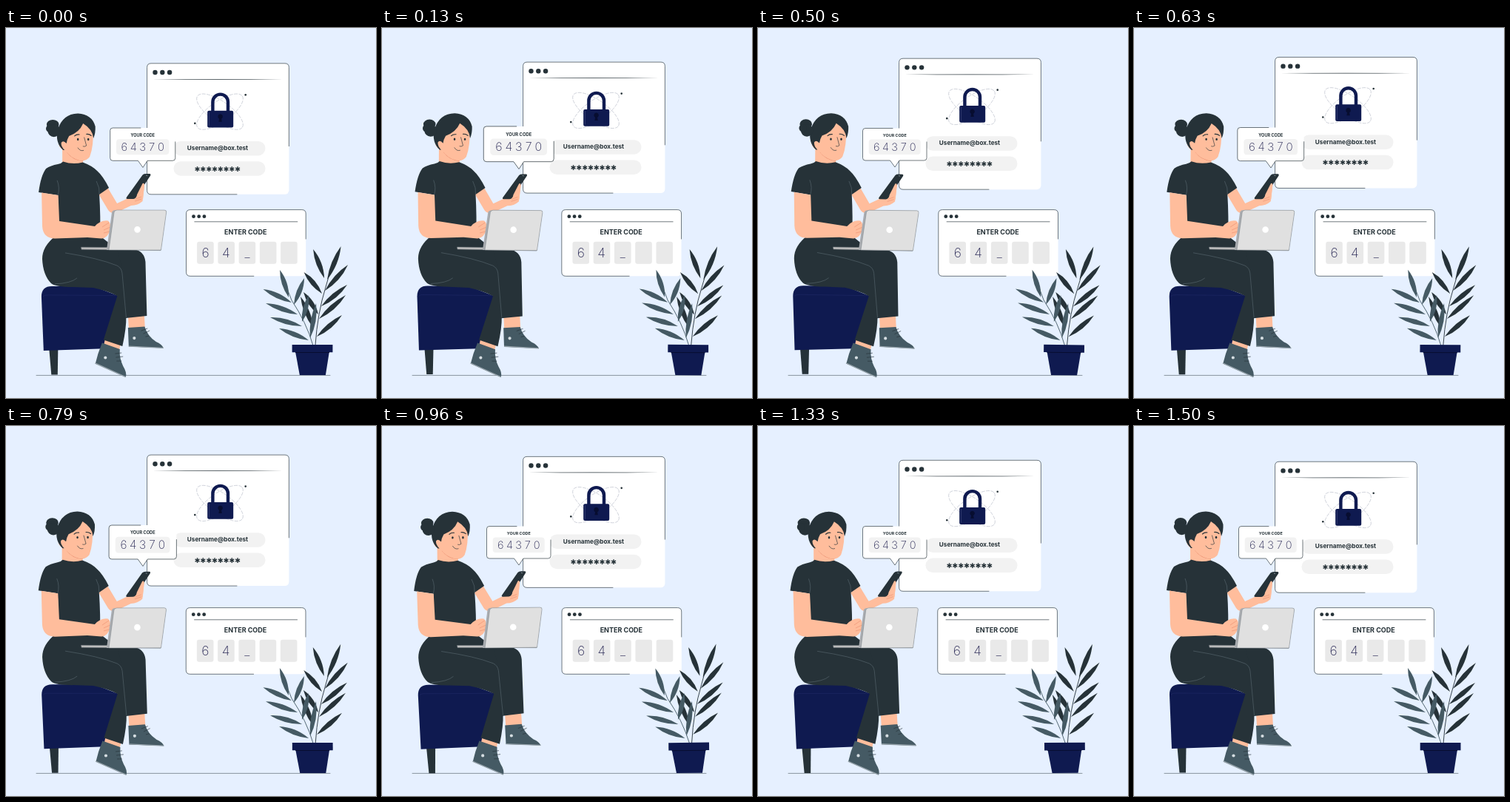
An HTML page that plays this animation: 500x500 px, repeating every 1.54 s.

```html
<!DOCTYPE html>
<html lang="en">
<head>
<meta charset="utf-8">
<title>Enter code</title>
<style>
html, body { margin: 0; width: 100%; height: 100%; overflow: hidden; background: #e6f0ff; }
svg { display: block; width: 100vw; height: 100vh; }
text { font-family: Inter, "Open Sans", sans-serif; text-anchor: middle; fill: #263238; }
.dark { fill: #263238; }
.slate { fill: #455a64; }
.navy { fill: #0f1a50; }
.skin { fill: #ffbd9c; }
.panel { fill: #fff; }
.field { fill: #f2f2f2; }
.cell { fill: #e9e9e9; }
.line { fill: none; stroke: #263238; stroke-width: .65; stroke-linecap: round; }
.seam { fill: none; stroke: #64757d; stroke-width: .5; }
.fold { fill: none; stroke: #e98e70; stroke-width: .6; }
.digit { fill: #2c2b58; font-weight: 200; }
.bold { font-weight: 700; }
</style>
</head>
<body>
<svg viewBox="0 0 500 500" xmlns="http://www.w3.org/2000/svg">
  <rect width="500" height="500" fill="#e6f0ff"/>
  <path class="line" d="M41 469.4H438" opacity=".75"/>

  <g id="login">
    <rect class="panel" x="190.6" y="48.2" width="191.8" height="177" rx="5.5"/>
    <path class="line" d="M312 225.2H196Q190.6 225.2 190.6 219.7V53.7Q190.6 48.2 196 48.2H377Q382.4 48.2 382.4 53.7V160"/>
    <g class="dark"><circle cx="201.5" cy="60.4" r="3.2"/><circle cx="211.3" cy="60.4" r="3.2"/><circle cx="221.1" cy="60.4" r="3.2"/></g>
    <path class="dark" d="M198 69.7Q286 69.2 374 69.7Q286 70.7 198 69.7Z"/>
    <g fill="none" stroke="#aab0bd" stroke-width=".5" stroke-dasharray="5 1.5">
      <ellipse cx="289" cy="113.5" rx="37" ry="14" transform="rotate(35 289 113.5)"/>
      <ellipse cx="289" cy="113.5" rx="37" ry="14" transform="rotate(-35 289 113.5)"/>
    </g>
    <circle class="dark" cx="323.7" cy="90.7" r="1.3"/>
    <circle class="dark" cx="255.3" cy="129.2" r="1.3"/>
    <path d="M279.4 114V100.3a10.3 10.3 0 0 1 20.6 0V114" fill="none" stroke="#0f1a50" stroke-width="4.4"/>
    <rect class="navy" x="272.2" y="112" width="35" height="22.8" rx="2"/>
    <path d="M289.6 116.6a3.4 3.4 0 0 1 1.5 6.4l.7 4h-4.4l.7-4a3.4 3.4 0 0 1 1.5-6.4z" fill="#070d30"/>
    <path d="M274.5 114v18.5" stroke="#5b6698" stroke-width=".4"/>
    <rect class="field" x="226.5" y="153.3" width="124" height="19.5" rx="9.7"/>
    <rect class="field" x="226.5" y="180.5" width="124" height="19.5" rx="9.7"/>
    <text class="bold" x="286" y="165.4" font-size="8.2">Username@box.test</text>
    <text x="286" y="194" font-size="9.3" style="font-family:'DejaVu Sans',sans-serif">✱✱✱✱✱✱✱✱</text>
  </g>

  <g id="card">
    <rect class="panel" x="243.7" y="245.6" width="161.7" height="89.7" rx="5.5"/>
    <path class="line" d="M335 335.3H249.2Q243.7 335.3 243.7 329.8V251Q243.7 245.6 249.2 245.6H400Q405.4 245.6 405.4 251V285"/>
    <g class="dark"><circle cx="253.7" cy="254.7" r="2.4"/><circle cx="260.9" cy="254.7" r="2.4"/><circle cx="268.1" cy="254.7" r="2.4"/></g>
    <path class="line" d="M255 261.8H394"/>
    <text class="bold" x="324" y="278.6" font-size="9">ENTER CODE</text>
    <g id="cells"></g>
    <text class="digit" x="269.7" y="309.5" font-size="17.5">6</text>
    <text class="digit" x="297.5" y="309.5" font-size="17.5">4</text>
    <text class="digit" x="326.2" y="310" font-size="16">_</text>
  </g>

  <g id="person">
    <path class="dark" d="M58.5 434H70.5L70 468.5H61.5Z"/>
    <path class="navy" d="M51 436L48 363Q48 349 62 349H118L152 362L140 433Z"/>
    <path d="M50 363Q52 360.5 58 361L148 361.5" fill="none" stroke="#222d6b" stroke-width=".5"/>

    <!-- far leg -->
    <path class="skin" d="M165 388H187L188 406H166Z"/>
    <path class="slate" d="M165 405L187.5 403.5Q191 416 203 424Q211 427.500 213 432.5L166 430.5Z"/>
    <path d="M166 430L213 432.3" stroke="#93a0a8" stroke-width="1.3"/>
    <path class="line" d="M183 409l8-3M186 413l8-4M189 417l4-1"/>
    <circle cx="173.5" cy="419" r="2.1" fill="#d5dde1"/>
    <path class="dark" d="M100 297L172 299Q187 301 188.5 316L190.5 389L162 392L148 330Z"/>

    <!-- near leg -->
    <path class="skin" d="M135 416L156 424L152.500 438L132 430Z"/>
    <path class="slate" d="M130 425.500L154 434Q153 446 158.5 457Q164 466 162 471.5L121 453.5Q124 440 130 425.500Z"/>
    <path d="M120.7 453L162 471.5" stroke="#93a0a8" stroke-width="1.4"/>
    <path class="line" d="M148 440l8-1M149 445l9-1M150 450l6 0"/>
    <circle cx="134.5" cy="445.5" r="2.1" fill="#d5dde1"/>
    <path class="dark" d="M67 281Q49 295 49 312Q50 334 61 345Q67 350 90 350L118 351Q140 356 150.5 362L132 421.500L157.500 430Q163 405 162.5 390L157 325L150 299L127 281Z"/>
    <path class="seam" d="M80 304Q125 311 150 321Q156 324 157 331L162.5 391"/>
    <path class="seam" d="M66 346Q88 345 96 338"/>

    <!-- far arm and phone -->
    <path class="skin" d="M125 223L137.500 216L150 237L165 230L175 214Q182 204 187 212L184.5 234Q178 240 169 240L150 249Q142 252 138 246L126 226Z"/>
    <path class="dark" d="M184.500 198.5Q186 197 189 197H194Q196 197 195 199.5L175.500 229Q174 231 172 231H164Q161.5 231 163 228.5Z"/>
    <path d="M189 199l2 .5" stroke="#93a0a8" stroke-width=".8"/>
    <path class="skin" d="M177 225L184.500 210Q188 208 186.500 216L185 231L175 237Q167 239 167 234L176 230Z"/>
    <path class="fold" d="M175 231l8-3M174 234l9-3"/>

    <!-- neck and shirt -->
    <path class="skin" d="M76 155V184Q90 188 104 185V170Z"/>
    <path d="M82 168Q90 179 104 180V176Z" fill="#e98e70"/>
    <path class="dark" d="M77 180.500Q75 183 70 184Q60 186 54 190Q47 199 44 222L70 226Q72 262 66 284H127Q128 256 126 225L139 216Q131 200 123 193Q116 186 103.500 181.500Q90 185 77 180.500Z"/>
    <path class="seam" d="M70 226Q73 216 69 206M126 225Q127 216 122 207"/>

    <!-- head -->
    <path class="skin" d="M77 142Q82 127 97 126Q115 124 117.500 135Q118.5 160 113 174Q108 181 99 179Q86 175 81 166Q72 164 71 156Q70 149 77 149Z"/>
    <path class="dark" d="M77 165Q66 155 69.500 138Q76 116 97 115.500Q116 116.500 120.500 133Q121 142 118 149Q117 137 104 129Q99 141 85 146Q82 151 81.500 156Q77 151 74.500 155Q74 160 79 165Z"/>
    <ellipse class="dark" cx="63" cy="130.500" rx="8.300" ry="6.500"/>
    <circle class="dark" cx="64.500" cy="139" r="8.300"/>
    <circle class="dark" cx="59" cy="136" r="5.200"/>
    <ellipse class="dark" cx="97" cy="150.5" rx="1.3" ry="1.7"/>
    <ellipse class="dark" cx="111" cy="150.5" rx="1.3" ry="1.7"/>
    <path d="M92.5 146Q95 143.500 99 144M108.5 143.500Q112 143 115 145.500" class="line" style="stroke-width:1.1"/>
    <path class="line" d="M105.5 148L108.5 159Q106 161 104 160M97 162Q100 167 104.5 165.5"/>

    <!-- laptop and near arm -->
    <path class="skin" d="M48 222.5L70.5 226L72 261L120 268Q128 259 138 260.5Q142 264 141 272Q138 284 129 284.500L110 283L66 284.5Q50 284 49 268Z"/>
    <path class="fold" d="M139 263l-9 6M141 269l-9 4M140 275l-8 2"/>
    <path d="M101.5 296.2L138 296.5L209 299.5V300.5L102 299.2Z" fill="#bdbdbd" stroke="#6f777c" stroke-width=".5"/>
    <path d="M148 246H214Q217 246 216.6 249L209.5 300H136L143 249Q144 246 148 246Z" fill="#a9acb0"/>
    <path d="M150 246H214Q217 246 216.6 249L209.5 300H139L146 249Q147 246 150 246Z" fill="#e0e0e0" stroke="#777e84" stroke-width=".5"/>
    <circle cx="177.5" cy="272.3" r="4.3" fill="#fff"/>
  </g>

  <g id="bubble">
    <path class="panel" d="M145 135.5H224.5Q228 135.5 228 139V175.5Q228 179 224.5 179H191L185 188L178.5 179H145Q141.5 179 141.5 175.5V139Q141.5 135.5 145 135.5Z"/>
    <path class="line" d="M228 154V175.5Q228 179 224.5 179H191L185 188L178.5 179H145Q141.5 179 141.5 175.5V139Q141.5 135.5 145 135.5H182"/>
    <rect class="field" x="149.7" y="150.5" width="70" height="20.5" rx="4"/>
    <text class="bold" x="184.8" y="147.2" font-size="5.4">YOUR CODE</text>
    <g id="digits"></g>
  </g>

  <g id="plant">
    <g id="leaves"></g>
    <path class="navy" d="M391 437H437L432 469H397Z"/>
    <rect class="navy" x="386.7" y="428" width="54.8" height="10.3"/>
    <path d="M391 438.5H437" stroke="#070d30" stroke-width="1"/>
  </g>
</svg>
<script>
const LOOP = 1540, CYCLE = 1500;
const $ = id => document.getElementById(id);
const move = (id, value) => $(id).setAttribute('transform', value);

$('cells').innerHTML = [0, 1, 2, 3, 4].map(i =>
  `<rect class="cell" x="${258.3 + 28.25 * i}" y="288.8" width="22.6" height="30" rx="3"/>`).join('');
$('digits').innerHTML = [...'64370'].map((d, i) =>
  `<text class="digit" x="${160.3 + 12.2 * i}" y="165.8" font-size="14.6">${d}</text>`).join('');

// A lens-shaped leaf from its base to its tip.
function leaf(cls, [x0, y0, x1, y1]) {
  const dx = x1 - x0, dy = y1 - y0, k = 9 / Math.hypot(dx, dy);
  const side = s => `${x0 + dx * .5 - dy * k * s} ${y0 + dy * .5 + dx * k * s}`;
  return `<path class="${cls}" d="M${x0} ${y0}Q${side(.8)} ${x1} ${y1}Q${side(-.7)} ${x0} ${y0}Z"/>`;
}

function branch(cls, color, stem, leaves) {
  return `<path d="${stem}" fill="none" stroke="${color}" stroke-width=".9"/>` +
    leaves.map(l => leaf(cls, l)).join('');
}

$('leaves').innerHTML =
  branch('dark', '#263238', 'M418 429Q421 385 432 350L440 322', [
    [434, 340, 452.5, 295], [430, 338, 415, 299], [431, 355, 462, 320],
    [427, 359, 402.5, 330], [426, 376, 461, 347], [422, 387, 402, 357],
    [423, 393, 459, 361], [420, 417, 454, 388], [415, 405, 398, 363]
  ]) +
  branch('slate', '#455a64', 'M415 429Q406 398 386 368L379 350', [
    [382, 364, 370, 327], [389, 374, 403, 338], [386, 371, 347.5, 353],
    [394, 387, 351, 372], [400, 403, 357, 391], [409, 422, 369, 406],
    [400, 397, 409, 361], [411, 419, 419, 372]
  ]);

// Linear keyframes: pairs of [share of the cycle, value].
function track(p, keys) {
  const i = Math.max(1, keys.findIndex(k => k[0] >= p));
  const [a, u] = keys[i - 1], [b, v] = keys[i];
  return u + (v - u) * (p - a) / (b - a);
}

const FLOAT = [[0, 0], [.5, -10], [1, 0]];
const WIND = [[0, 0], [.25, 1], [.75, -1], [1, 0]];
const BEAT = [[0, 1], [.1, 1.1], [.3, 1], [.4, 1], [.5, 1.1], [.6, 1], [1, 1]];
const SHAKE = [[0, 0], [.1, -1], [.2, 2], [.3, -4], [.4, 4], [.5, -4],
  [.6, 4], [.7, -4], [.8, 2], [.9, -1], [1, 0]];

function draw(time) {
  const p = Math.min(time % LOOP + 27, CYCLE) / CYCLE;
  const sway = track(p, WIND);
  move('login', `translate(0 ${track(p, FLOAT)})`);
  move('card', `translate(${track(p, SHAKE)} 0)`);
  move('bubble', `translate(184.8 161.8) scale(${track(p, BEAT)}) translate(-184.8 -161.8)`);
  move('person', `rotate(${sway} 130 294)`);
  move('plant', `rotate(${sway} 404.5 382)`);
}

let start;
function tick(now) {
  start ??= now;
  draw(now - start);
  requestAnimationFrame(tick);
}
draw(0);
requestAnimationFrame(tick);
</script>
</body>
</html>
```
